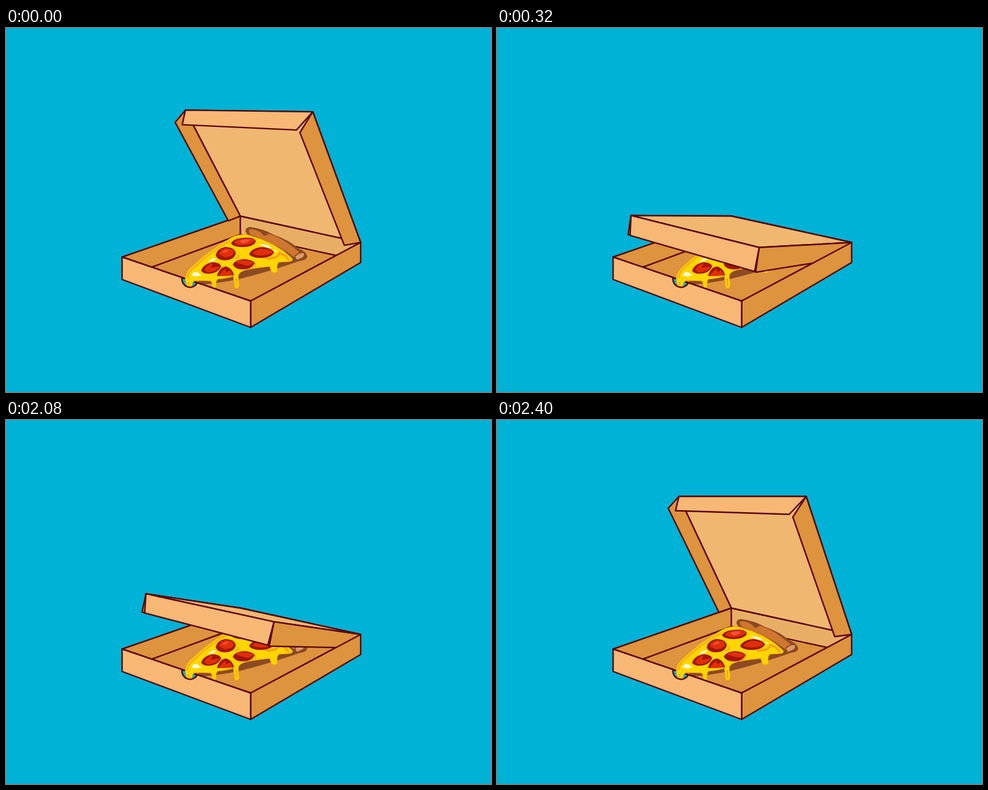
Write an HTML page that moves like this. It is 800 by 600 pixels and loops after 3.84 s.

```html
<!DOCTYPE html>
<html lang="en">
<head>
<meta charset="utf-8">
<title>Pizza box</title>
<style>
  html, body { margin: 0; width: 100%; height: 100%; overflow: hidden; background: #00b2d6; }
  svg { display: block; width: 100%; height: 100%; }
  .card { stroke: #5a0406; stroke-width: 2.4; stroke-linejoin: round; stroke-linecap: round; }
  .dark { fill: #de933e; }
  .front { fill: #f7b775; }
  .top { fill: #f0b771; }
</style>
</head>
<body>
<svg viewBox="0 0 800 600">
  <!-- inside of the tray -->
  <g class="card">
    <path class="dark" d="M191.5 377.5 386.5 310 585 353.5 403.5 450Z"/>
    <path fill="#e9ae66" d="M386.5 310 585 353.5 545 375 386.5 340.5Z"/>
    <path fill="none" d="M241 394 386.5 340.5"/>
  </g>

  <g id="pizza">
    <path fill="#8c4a22" d="M490 382 Q440 400 384 414 Q350 421 312 424 L330 404 440 380Z"/>
    <path fill="#8c4a22" d="M395 335 Q395 328 403 328 Q425 331 442 341 Q466 349 482 363 Q496 369 497 377 Q495 384 482 384 L472 384 Q452 362 398 341Z"/>
    <path fill="#cf7730" d="M401 332 Q410 331 420 337 L426 343 434 339 Q460 348 478 365 Q485 369 483 371 Q476 373 475 378 Q452 358 404 341 Q400 337 401 332Z"/>
    <path fill="#dd9b68" d="M477 377 Q484 370 491 371 Q493 376 487 379 L480 382Z"/>
    <path fill="#ffd500" stroke="#f9a01b" stroke-width="1" d="M296 418 Q294 406 304 396 Q331 369 371 346 Q385 339 399 341 Q447 354 472 380 Q474 385 466 385 L450 386 Q445 392 448 402 Q443 405 438 402 L435 393 Q414 395 399 398 Q383 401 383 410 L385 425 Q381 432 377 427 L375 409 Q368 412 349 414 Q345 418 347 427 Q343 430 340 426 Q341 419 337 417 L313 416 Q306 418 307 427 Q302 429 298 426Z"/>
    <g fill="none" stroke="#f9a01b" stroke-width="2" stroke-linecap="round">
      <path d="M299 412 Q301 401 312 393 Q336 370 369 351"/>
      <path d="M430 380 Q449 380 451 371 Q462 374 466 382" stroke-width="3.5"/>
      <path d="M378 380 Q385 379 383 374 M403 396 Q412 393 411 387 M380 413 380 424 M301 419 301 424"/>
    </g>
    <path fill="#fff8dc" d="M306 408 Q309 401 314 402 L322 407 Q316 411 306 408Z M334 385 Q339 379 347 380 Q344 386 334 385Z M417 356 Q432 356 439 363 Q429 363 417 356Z M440 364 449 369 444 369Z M376 385 381 382 379 388Z"/>
    <g fill="#a51408">
      <path d="M371 355 Q374 348 389 346 Q409 344 412 351 Q411 359 394 361 Q376 362 371 355Z"/>
      <path d="M346 374 Q348 364 361 361 Q377 361 379 371 Q377 382 362 383 Q348 383 346 374Z"/>
      <path d="M401 373 Q405 363 421 361 Q438 362 442 370 Q437 379 420 379 Q406 379 401 373Z"/>
      <path d="M374 390 Q377 382 392 381 Q408 382 410 388 Q405 398 390 398 Q377 397 374 390Z"/>
      <path d="M322 400 Q325 389 341 386 Q354 387 355 393 Q349 405 334 405 Q324 405 322 400Z"/>
      <path d="M348 409 Q352 394 363 393 Q374 396 376 408Z"/>
    </g>
    <g fill="#df2f08">
      <path d="M376 353 Q382 347 396 347 Q410 346 410 351 Q405 357 390 358 Q379 358 376 353Z"/>
      <path d="M351 373 Q353 364 363 363 Q376 364 376 371 Q373 377 361 378Z"/>
      <path d="M406 372 Q413 364 423 364 Q437 365 440 370 Q432 375 418 375Z"/>
      <path d="M378 386 Q384 382 394 383 Q407 384 408 388 Q400 394 391 390Z"/>
      <path d="M327 399 Q331 390 341 388 L338 395 353 393 Q347 402 333 403Z"/>
      <path d="M350 409 357 401 361 397 364 403 369 399 375 408Z"/>
    </g>
    <path fill="#f4503a" d="M385 351 Q392 347 402 349 Q399 355 389 355Z M356 371 Q359 365 367 366 Q367 370 356 371Z"/>
  </g>

  <g id="lid" class="card">
    <path id="left" class="dark"/>
    <path id="plane" class="top"/>
    <path id="right" class="dark"/>
    <path id="flap" class="front"/>
  </g>

  <!-- outer walls -->
  <g class="card">
    <path class="dark" d="M403.5 450 585 353.5 585 386.5 403.5 493.5Z"/>
    <path class="front" d="M191.5 377.5 290.5 411.4 A13.3 13.3 0 0 0 315.5 419.9 L403.5 450 403.5 493.5 191.5 414.5Z"/>
  </g>
</svg>

<script>
const STEP = 40, STEPS = 13, HALF = 1920;
const byId = id => document.getElementById(id);
const [lid, left, plane, right, flap] = ['lid', 'left', 'plane', 'right', 'flap'].map(byId);

// Corners: x, y when shut, then x, y when open
const hingeL = [386.5, 310, 386.5, 310];
const hingeR = [585, 353.5, 585, 353.5];
const cornerL = [191.5, 377.5, 300, 126];
const cornerR = [403.5, 450, 510, 126];
const flapL = [191.5, 414, 294.5, 149.5];
const flapR = [403.5, 493.5, 482, 155.5];
const leftTip = [191.5, 414, 282.5, 145.5];
const leftEnd = [386.5, 340.5, 366, 317];
const rightTip = [403.5, 493.5, 488, 160];
const rightEnd = [585, 386.5, 557, 357];

// Cubic ease (1/6, 0, 5/6, 1), solved by bisection
function ease(x) {
  if (x >= 1) return 1;
  let lo = 0, hi = 1;
  for (let i = 0; i < 24; i++) {
    const s = (lo + hi) / 2, r = 1 - s;
    if (0.5 * r * r * s + 2.5 * r * s * s + s * s * s < x) lo = s; else hi = s;
  }
  return lo * lo * (3 - 2 * lo);
}

function shape(path, open, ...corners) {
  const points = corners.map(([x0, y0, x1, y1]) =>
    (x0 + (x1 - x0) * open).toFixed(2) + ' ' + (y0 + (y1 - y0) * open).toFixed(2));
  path.setAttribute('d', 'M' + points.join(' ') + 'Z');
}

function draw(now) {
  const t = now % (2 * HALF);
  const moved = ease((Math.floor(t % HALF / STEP) + 1) / STEPS);
  const open = t < HALF ? 1 - moved : moved;

  shape(left, open, cornerL, leftTip, leftEnd, hingeL);
  shape(plane, open, hingeL, cornerL, cornerR, hingeR);
  shape(right, open, cornerR, rightTip, rightEnd, hingeR);
  shape(flap, open, cornerL, flapL, flapR, cornerR);
  // The left side is hidden behind the lid while its outside faces us
  lid.insertBefore(left, open < 0.396 ? plane : right);
}

let start;
function tick(now) {
  start ??= now;
  draw(now - start);
  requestAnimationFrame(tick);
}
draw(0);
requestAnimationFrame(tick);
</script>
</body>
</html>
```
